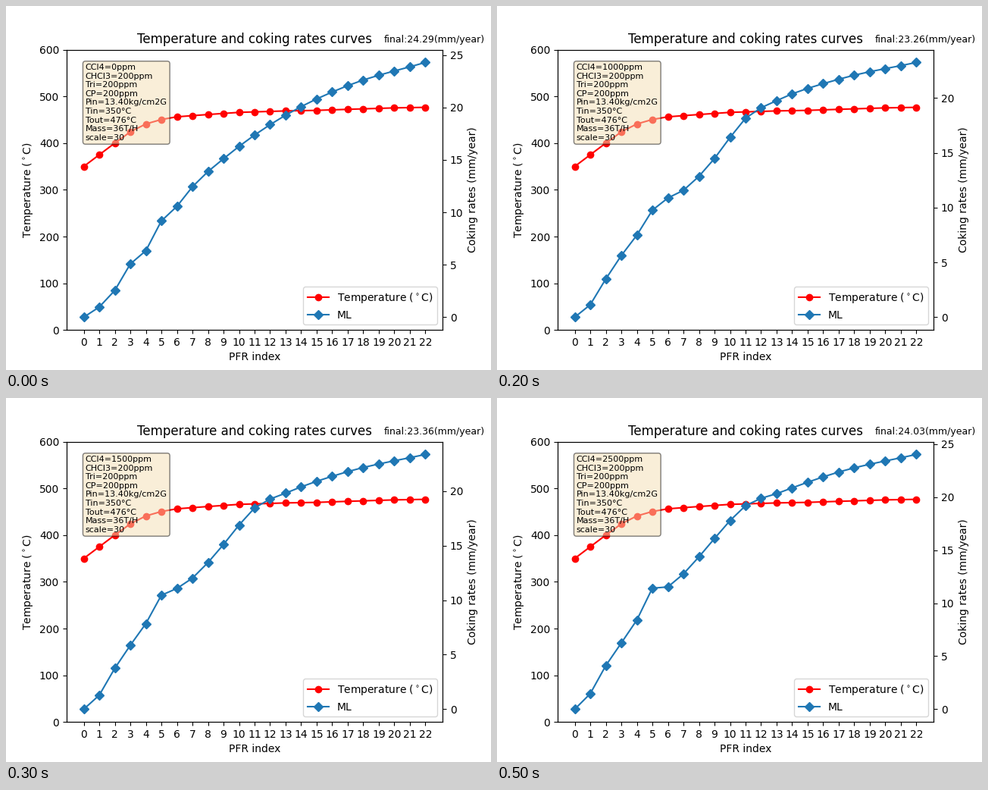
Animation of 640 by 480 pixels, one loop 600 ms. Source, as a matplotlib script:

```python
import numpy as np
import matplotlib.pyplot as plt
from matplotlib.animation import FuncAnimation

plt.rcParams["font.family"] = "DejaVu Sans"

INDEX = np.arange(23)

# CCl4 dose in ppm -> final coking rate in mm/year
FINAL_RATE = {0: 24.29, 500: 23.40, 1000: 23.26, 1500: 23.36, 2000: 23.68, 2500: 24.03}
DOSES = list(FINAL_RATE)

# Key points of the coking profiles, in percent of the final rate
KEY_INDEX = [0, 1, 2, 3, 4, 5, 6, 7, 9, 11, 13, 17, 22]
CLEAN = [0, 4, 10.5, 20.9, 26.1, 37.8, 43.5, 51.2, 62.2, 71.5, 79.3, 90.9, 100]
LIGHT = [0, 4.3, 14.2, 23.2, 31, 40, 44.9, 47.7, 59.4, 74.4, 83.3, 93.3, 100]
MEDIUM = [0, 4.9, 15, 24.2, 32.2, 42, 46.8, 49.8, 62.3, 78.1, 85, 93.4, 100]
HEAVY = [0, 6.1, 17.1, 26, 35, 47.5, 48, 53.1, 67, 79.9, 84.6, 93.1, 100]
LIGHT_SURGES = {6: 18.1, 15: 9.7, 16: 9.3}


def smooth(xs, ys):
    """Cubic Hermite curve through the key points, sampled at every index."""
    xs, ys = np.array(xs, float), np.array(ys, float)
    slope = np.gradient(ys, xs)
    i = np.clip(np.searchsorted(xs, INDEX, side="right") - 1, 0, len(xs) - 2)
    width = xs[i + 1] - xs[i]
    t = (INDEX - xs[i]) / width
    ease = t * t * (3 - 2 * t)
    bend = t * (1 - t) * (slope[i] * (1 - t) - slope[i + 1] * t)
    return ys[i] + (ys[i + 1] - ys[i]) * ease + width * bend


def coking_rates(dose):
    if dose >= 1000:
        # The effect of more CCl4 levels off from the medium to the heavy dose
        mix = np.interp(-dose ** -0.5, [-1000 ** -0.5, -2500 ** -0.5], [0, 1])
        keys = (1 - mix) * np.array(MEDIUM) + mix * np.array(HEAVY)
    else:
        keys = LIGHT if dose else CLEAN
    percent = smooth(KEY_INDEX, keys)
    if dose == 500:
        for index, surge in LIGHT_SURGES.items():
            percent[index] += surge
    return FINAL_RATE[dose] * percent / 100


def conditions(dose):
    return "\n".join([
        f"CCl4={dose}ppm", "CHCl3=200ppm", "Tri=200ppm", "CP=200ppm",
        "Pin=13.40kg/cm2G", "Tin=350°C", "Tout=476°C", "Mass=36T/H", "scale=30",
    ])


temperature = np.interp(
    INDEX,
    [0, 2, 3, 4, 5, 6, 8, 10, 13, 15, 17, 20, 22],
    [350, 400, 424, 441, 450.5, 456.3, 461.2, 465.8, 468.9, 470.1, 472.3, 475.4, 476.6],
)

fig, ax = plt.subplots(figsize=(6.4, 4.8), dpi=100)
rate_ax = ax.twinx()

temp_label = r"Temperature ($^\circ$C)"
temp_line, = ax.plot(INDEX, temperature, "o-", color="red", label=temp_label)
rate_line, = rate_ax.plot(INDEX, coking_rates(0), "D-", color="tab:blue", label="ML")

ax.set_title("Temperature and coking rates curves")
ax.set_xlabel("PFR index")
ax.set_ylabel(temp_label)
ax.set_xticks(INDEX)
ax.set_ylim(0, 600)
rate_ax.set_ylabel("Coking rates (mm/year)")
rate_ax.legend(handles=[temp_line, rate_line], loc="lower right")

info = ax.text(0.05, 0.95, "", transform=ax.transAxes, fontsize=8, va="top",
               bbox=dict(boxstyle="round", facecolor="wheat", alpha=0.5))
final_text = fig.text(0.78, 0.9, "", fontsize=9)


def update(step):
    dose = DOSES[step]
    rates = coking_rates(dose)
    margin = 0.05 * rates.max()
    rate_line.set_ydata(rates)
    rate_ax.set_ylim(-margin, rates.max() + margin)
    info.set_text(conditions(dose))
    final_text.set_text(f"final:{rates[-1]:.2f}(mm/year)")
    return rate_line, info, final_text


anim = FuncAnimation(fig, update, frames=len(DOSES), interval=100, repeat=True)
plt.show()
```
